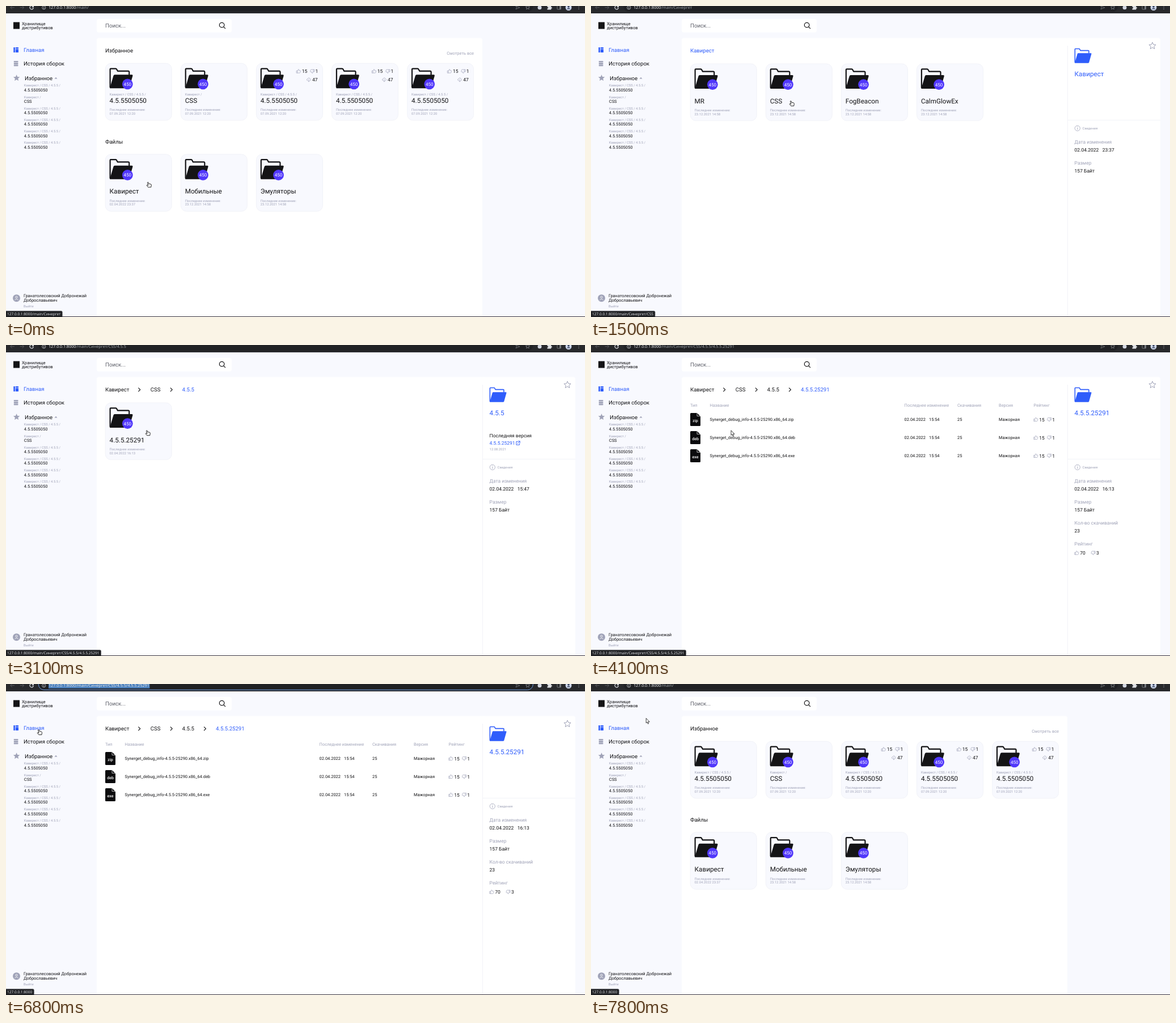
Recreate the animation shown at these times as an HTML page. Size 1021 by 549 pixels, loop 8 s.

```html
<!DOCTYPE html>
<html lang="ru">
<head>
<meta charset="utf-8">
<style>
html, body { margin: 0; width: 100%; height: 100%; overflow: hidden; background: #f8f9fe; }
svg { display: block; width: 1021px; height: 549px; }
text { font-family: Roboto, sans-serif; text-rendering: geometricPrecision; white-space: pre; }
.chrome text { font-family: "Noto Sans", sans-serif; }
</style>
</head>
<body>
<svg id="stage" viewBox="0 0 1021 549" xmlns="http://www.w3.org/2000/svg"></svg>
<script>
const INK = '#141416', GREY = '#a0a3b8', BLUE = '#2f5dfb', LINE = '#eff0f7';
const BRAND = 'Кавирест', HOST = '127.0.0.1:8000', VERSION = '4.5.5.25291';

// Drawing helpers, all returning SVG markup
const text = (x, y, s, size, fill = INK, extra = '') =>
  `<text x="${x}" y="${y}" font-size="${size}" fill="${fill}" ${extra}>${s}</text>`;
const rect = (x, y, w, h, fill, r = 0, extra = '') =>
  `<rect x="${x}" y="${y}" width="${w}" height="${h}" rx="${r}" fill="${fill}" ${extra}/>`;
const circle = (x, y, r, fill, extra = '') =>
  `<circle cx="${x}" cy="${y}" r="${r}" fill="${fill}" ${extra}/>`;
const line = (d, stroke, width = 1, fill = 'none') =>
  `<path d="${d}" stroke="${stroke}" stroke-width="${width}" fill="${fill}" stroke-linejoin="round" stroke-linecap="round"/>`;
const place = (x, y, body, scale = 1) =>
  `<g transform="translate(${x} ${y}) scale(${scale})">${body}</g>`;

function star(x, y, r, fill, stroke = 'none') {
  const points = [...Array(10)].map((_, i) => {
    const a = i * Math.PI / 5, d = i % 2 ? r * .46 : r;
    return [(x + d * Math.sin(a)).toFixed(2), (y - d * Math.cos(a)).toFixed(2)];
  });
  return `<polygon points="${points.join(' ')}" fill="${fill}" stroke="${stroke}" stroke-linejoin="round"/>`;
}

const folder = color =>
  line('M1.2 34V2.6Q1.2 1.4 2.4 1.4H11Q12.200 1.400 12.800 2.600L14.400 5.600H33.500Q34.800 5.600 34.800 7V12', color, 2.2) +
  `<path d="M.6 36L7 14Q7.500 12 9.500 12H39.500Q41.600 12 41 14L35.200 34.500Q34.700 36 33 36Z" fill="${color}"/>`;

const thumb = line('M.5 3.2H2V7H.5ZM2 3.4L3.6 .5Q5 .3 4.7 2.8H7Q7.6 3 7.4 3.7L6.6 6.5Q6.4 7 6 7H2', GREY, .7);
const thumbDown = `<g transform="rotate(180 4 3.75)">${thumb}</g>`;
const votes = (x, y, up, down, downX) =>
  place(x, y - 4, thumb) + text(x + 9.7, y + 3.1, up, 8.5) +
  place(x + downX, y - 3.5, thumbDown) + text(x + downX + 9.5, y + 3.1, down, 8.5);
const cloud = line('M2 5.5Q.3 5.3 .5 3.6Q.8 2.5 2 2.5Q2.8 .4 4.6 .8Q6 1 6.2 2.6Q7.6 3 7.4 4.3Q7.1 5.5 6 5.5M4 3.5V7.4M2.9 6.3L4 7.4L5.1 6.3', GREY, .7);

function card(column, y, title, date, { path = '', rated = false } = {}) {
  return place(175.2 + 133.1 * column, y,
    rect(0, 0, 117, 100.6, '#f8f9fe', 10, `stroke="${LINE}" stroke-width=".8"`) +
    place(7.2, 8, folder(INK)) +
    circle(39.1, 36.6, 9.4, '#5138fb') +
    text(39.1, 39.5, '450', 8, '#fff', 'text-anchor="middle"') +
    text(7.4, 57, path, 5.85, GREY) +
    text(7.4, 69.7, title, 11.7) +
    text(7.4, 84, 'Последнее изменение:', 5.85, GREY) +
    text(7.4, 90.6, date, 5.85, GREY) +
    (rated ? votes(70.6, 14, 15, 1, 24) + place(88.5, 25, cloud) + text(98.6, 32, 47, 8.5) : ''));
}

function crumbs(names) {
  const textX = [175, 254.8, 310.6, 370], arrowX = [233.7, 290.2, 349.4];
  return names.map((name, i) =>
    text(textX[i], 82, name, 9.58, i === names.length - 1 ? BLUE : INK) +
    (i ? line(`M${arrowX[i - 1]} 75.8l3 3l-3 3`, INK, 1.2) : '')).join('');
}

function details(title, time, { latest = false, stats = false } = {}) {
  const field = (y, label, value) => text(852.6, y, label, 8.5, GREY) + text(852.6, y + 14.4, value, 8.5);
  return rect(840, 56.5, 164, 492, '#fff', 4) + rect(836, 56.5, 8, 492, '#fff') +
    rect(840, 70, .8, 479, LINE) + rect(840, 201, 164, .8, LINE) +
    star(990, 70.4, 6.4, 'none', GREY) +
    place(852.5, 74.5, folder(BLUE), .73) +
    text(852.6, 123.5, title, 11.7, BLUE) +
    (latest ? text(852.6, 163, 'Последняя версия', 8.5) + text(852.6, 176.3, VERSION, 8.5, BLUE) +
      line('M902 170.5H899.8V176.3H905.4V174M903 169.8H906.2V173M906 170L902 174', BLUE, .9) +
      text(852.6, 186, '12.08.2021', 5.85, GREY) : '') +
    circle(857.8, 215.8, 4.6, 'none', `stroke="${GREY}" stroke-width=".8"`) +
    line('M857.8 215.4V218M857.8 213.5V213.6', GREY, .9) +
    text(866.6, 218, 'Сведения', 5.85, GREY) +
    field(242.5, 'Дата изменения', '02.04.2022') + text(901.7, 256.9, time, 8.5) +
    field(279.8, 'Размер', '157 Байт') +
    (stats ? field(317, 'Кол-во скачиваний', 23) + text(852.6, 354.3, 'Рейтинг', 8.5, GREY) +
      votes(852.6, 367, 70, 3, 28.8) : '');
}

function fileRow(type, i) {
  const y = 131.5 + 32 * i, cell = (x, s) => text(x, y + 2.7, s, 7.45);
  return `<path d="M175 ${y - 10}q0-1.5 1.5-1.5H187l6 6v15.5q0 1.5-1.5 1.5h-15q-1.5 0-1.5-1.5Z" fill="#0b0b0d"/>` +
    line(`M187 ${y - 11.3}v5.2h5.6`, '#fff', .7) +
    text(184, y + 4.2, type, 7, '#fff', 'text-anchor="middle" font-weight="500"') +
    cell(209.5, `Synerget_debug_info-4.5.5-25290.x86_64.${type}`) +
    cell(552.6, '02.04.2022') + cell(596, '15:54') + cell(646, 25) + cell(719, 'Мажорная') +
    votes(780.6, y, 15, 1, 23.2);
}

function mainPage() {
  const path = `${BRAND} / CSS / 4.5.5 /`;
  return text(175, 82, 'Избранное', 9.58) + text(825, 85.6, 'Смотреть все', 7.45, GREY, 'text-anchor="end"') +
    [0, 1, 2, 3, 4].map(i => card(i, 101.2, i === 1 ? 'CSS' : '4.5.5505050', '07.09.2021 12:20',
      { path: i === 1 ? `${BRAND} /` : path, rated: i > 1 })).join('') +
    text(175, 243.4, 'Файлы', 9.58) +
    [BRAND, 'Мобильные', 'Эмуляторы'].map((name, i) =>
      card(i, 261.8, name, i ? '23.12.2021 14:58' : '02.04.2022 23:37')).join('');
}

const folderPage = (names, time, cards, date, options) =>
  details(names.at(-1), time, options) + crumbs(names) +
  cards.map((name, i) => card(i, 102, name, date)).join('');

const filesPage = () =>
  details(VERSION, '16:13', { stats: true }) + crumbs([BRAND, 'CSS', '4.5.5', VERSION]) +
  [[175, 'Тип'], [209.5, 'Название'], [552.6, 'Последнее изменение'], [646, 'Скачивания'], [719, 'Версия'], [780.6, 'Рейтинг']]
    .map(([x, s]) => text(x, 108.5, s, 7.45, GREY)).join('') +
  ['zip', 'deb', 'exe'].map(fileRow).join('');

const paths = ['', 'Синергет', 'Синергет/CSS', 'Синергет/CSS/4.5.5', 'Синергет/CSS/4.5.5/4.5.5.25291'].map(p => '/main/' + p);
const pages = [
  mainPage(),
  folderPage([BRAND], '23:37', ['MR', 'CSS', 'FogBeacon', 'CalmGlowEx'], '23.12.2021 14:58'),
  folderPage([BRAND, 'CSS'], '15:40', ['4.5.5', '4.4.5'], '02.04.2022 15:47', { latest: true }),
  folderPage([BRAND, 'CSS', '4.5.5'], '15:47', [VERSION], '02.04.2022 16:13', { latest: true }),
  filesPage()
];

function sidebar() {
  const items = [0, 1, 2, 3, 4, 5].map(i => {
    const y = 142.3 + 20.2 * i, short = i === 1;
    return text(31.8, y, short ? `${BRAND} /` : `${BRAND} / CSS / 4.5.5 /`, 5.85, GREY) +
      text(31.8, y + 8.5, short ? 'CSS' : '4.5.5505050', 7.45);
  }).join('');
  return rect(13, 28.5, 11, 12, INK) +
    text(28, 33.6, 'Хранилище', 7.7) + text(28, 40.6, 'дистрибутивов', 7.7) +
    rect(13.3, 73, 2.6, 9, BLUE) + rect(16.8, 73, 5.2, 2.4, BLUE) + rect(16.8, 76.2, 5.2, 5.8, BLUE) +
    text(31, 81, 'Главная', 9.58, BLUE) +
    [97, 100.3, 103.6].map(y => rect(13.8, y, 7.6, 2.6, GREY, .4)).join('') +
    text(31, 104.8, 'История сборок', 9.58) +
    star(18.6, 127.2, 6, GREY) + text(33, 130.5, 'Избранное', 9.58) +
    `<path d="M85.5 128.5l2.5-2.8l2.5 2.8Z" fill="${GREY}"/>` + items +
    circle(18.5, 515.7, 6.5, GREY) + circle(18.5, 514, 1.7, 'none', 'stroke="#fff" stroke-width=".8"') +
    line('M15.5 519Q18.5 515.5 21.5 519', '#fff', .8) +
    text(31, 513.8, 'Гранатолесовский Добронежай', 7.45) + text(31, 522.3, 'Доброславьевич', 7.45) +
    text(31, 532, 'Выйти', 5.85, GREY);
}

function browser() {
  const pale = '#dfe1e5', dim = '#75787d', faint = '#55585c';
  return rect(0, 0, 1021, 13, '#28292c') +
    rect(57.3, -9, 872, 19.3, '#202124', 9.6, 'id="omnibox"') +
    line('M14.5 2.7H8M10.5 0L8 2.7L10.5 5.4', faint) +
    line('M25 2.7H31.5M29 0L31.5 2.7L29 5.4', faint) +
    line('M47.8 .8A3.2 3.2 0 1 0 48.3 3.5M48.4 -.5V1.6H46.2', pale, 1.2) +
    circle(66.8, 2.8, 3.1, 'none', `stroke="${pale}" stroke-width=".7"`) + line('M66.8 2.6V4.4M66.8 1V1.1', pale, .8) +
    rect(75, -1, 178.4, 8.8, '#4b80bd', 0, 'id="selection"') +
    `<text x="75" y="5.4" font-size="7.14" fill="#e8eaed">${HOST}<tspan id="path"></tspan></text>` +
    line('M899 0L906 2.8L899 5.6L900.5 2.8Z', dim, .8) + star(920, 2.6, 3.9, 'none', dim) +
    circle(941, 2.8, 3.5, '#d4d8e2') +
    `<path d="M954.5 0H957Q956.3 -2 958 -2T959 0H961.3V2.3Q963 1.8 963 3.3T961.3 4.3V6.5H954.5V4.3Q956.2 4.3 956.2 3.2T954.5 2Z" fill="${pale}"/>` +
    rect(972, -.5, 6.5, 6.4, 'none', .6, `stroke="${dim}"`) + rect(976, -.5, 2.5, 6.4, dim) +
    circle(992, 2.6, 5.4, '#cdd6ea') + circle(992, 1.2, 1.6, '#35415c') +
    '<path d="M988.8 5.6Q992 1.6 995.2 5.6Z" fill="#35415c"/>' +
    [.2, 2.8, 5.4].map(y => circle(1010, y, .8, dim)).join('') +
    rect(0, 548, 1021, 1, '#37303a') +
    '<g id="status">' + rect(-3, 538.4, 0, 14, '#202124', 2, 'stroke="#46474b" stroke-width=".6"') +
    text(2, 546.2, '', 6.53, '#dcdee2') + '</g>';
}

// Pointer shapes are centred on the origin
const pointers = {
  hand: line('M-2.6 -4.2Q-1.5 -5 -1 -3.8L-.6 -1.8L2.6 -1.2Q4 -.8 4 .4L3.4 4.4H-1.7L-4.2 1.2Q-4 0 -2.7 .6L-1.8 1.2Z', '#111', .9, '#fff'),
  arrow: line('M-2.6 -4.8V3.2L-.8 1.7L.6 4.8L1.9 4.2L.6 1.2H3.1Z', '#111', .8, '#fff'),
  beam: line('M-1.5 -4H1.5M0 -4V4M-1.5 4H1.5', '#fff', 1.8) + line('M-1.5 -4H1.5M0 -4V4M-1.5 4H1.5', '#111', .8)
};

const stage = document.getElementById('stage');
stage.innerHTML =
  rect(0, 0, 1021, 549, '#f8f9fe') + sidebar() +
  rect(160, 22.8, 238, 24, '#fff', 4) + text(175, 38.3, 'Поиск...', 9.7, '#5c5e68') +
  circle(380.6, 33.6, 4.3, 'none', `stroke="${INK}" stroke-width="1.2"`) + line('M383.8 36.8L386.6 39.6', INK, 1.2) +
  rect(160, 56.5, 680, 496, '#fff', 4) +
  pages.map(p => `<g class="page">${p}</g>`).join('') +
  `<g class="chrome">${browser()}</g>` +
  Object.entries(pointers).map(([name, p]) => `<g class="pointer" data-kind="${name}">${p}</g>`).join('');

const $ = s => stage.querySelector(s);
const pageNodes = stage.querySelectorAll('.page'), pointerNodes = stage.querySelectorAll('.pointer');
const show = (node, on) => node.setAttribute('display', on ? 'inline' : 'none');

// Cues: [start time, value...]
const pageCues = [[0, 0], [600, 1], [2000, 2], [3100, 3], [4100, 4], [7300, 0]];
const statusCues = [
  [0, HOST + paths[1]], [900, ''], [1500, HOST + paths[2]], [2000, HOST + paths[2] + '/4.4.5'],
  [3100, HOST + paths[4]], [4400, ''], [6800, HOST]
];
const pointerCues = [
  [0, 'hand', 252.3, 315.5], [600, 'arrow', 252.3, 315.5], [1500, 'hand', 354.3, 172],
  [2400, 'hand', 318, 165], [2500, 'hand', 290.5, 159.5], [3100, 'hand', 250.3, 155.3],
  [4100, 'arrow', 249.6, 156], [4400, 'arrow', 258, 75], [4500, 'beam', 267.3, 7.5],
  [6200, 'arrow', 155.3, 70.5], [6400, 'arrow', 79.3, 76.5], [6600, 'hand', 59.5, 85.2], [7800, 'arrow', 99.8, 65.6]
];
const current = (cues, t) => cues.findLast(c => c[0] <= t).slice(1);

function pointerAt(t) {
  if (t < 900 || t >= 1500) return current(pointerCues, t);
  const p = (Math.floor((t - 900) / 100) + 1) / 7, e = p * p * (3 - 2 * p);
  const y = 315.5 - 143.5 * e;
  return [y < 203 ? 'hand' : 'arrow', 252.3 + 102 * e, y];
}

function draw(now) {
  const t = now % 8000;
  const [page] = current(pageCues, t), [status] = current(statusCues, t), [kind, x, y] = pointerAt(t);
  const focused = t >= 4700 && t < 7300;
  pageNodes.forEach((node, i) => show(node, i === page));
  $('#path').textContent = paths[page];
  $('#path').setAttribute('fill', focused ? '#e8eaed' : '#9aa0a6');
  show($('#selection'), focused);
  $('#omnibox').setAttribute('stroke', focused ? '#6e9ce0' : 'none');
  show($('#status'), status);
  const label = $('#status text');
  if (label.textContent !== status) {
    label.textContent = status;
    if (status) $('#status rect').setAttribute('width', label.getComputedTextLength() + 8);
  }
  pointerNodes.forEach(node => {
    show(node, node.dataset.kind === kind);
    node.setAttribute('transform', `translate(${x} ${y})`);
  });
}

const start = performance.now();
function tick() {
  draw(performance.now() - start);
  requestAnimationFrame(tick);
}
tick();
</script>
</body>
</html>
```
